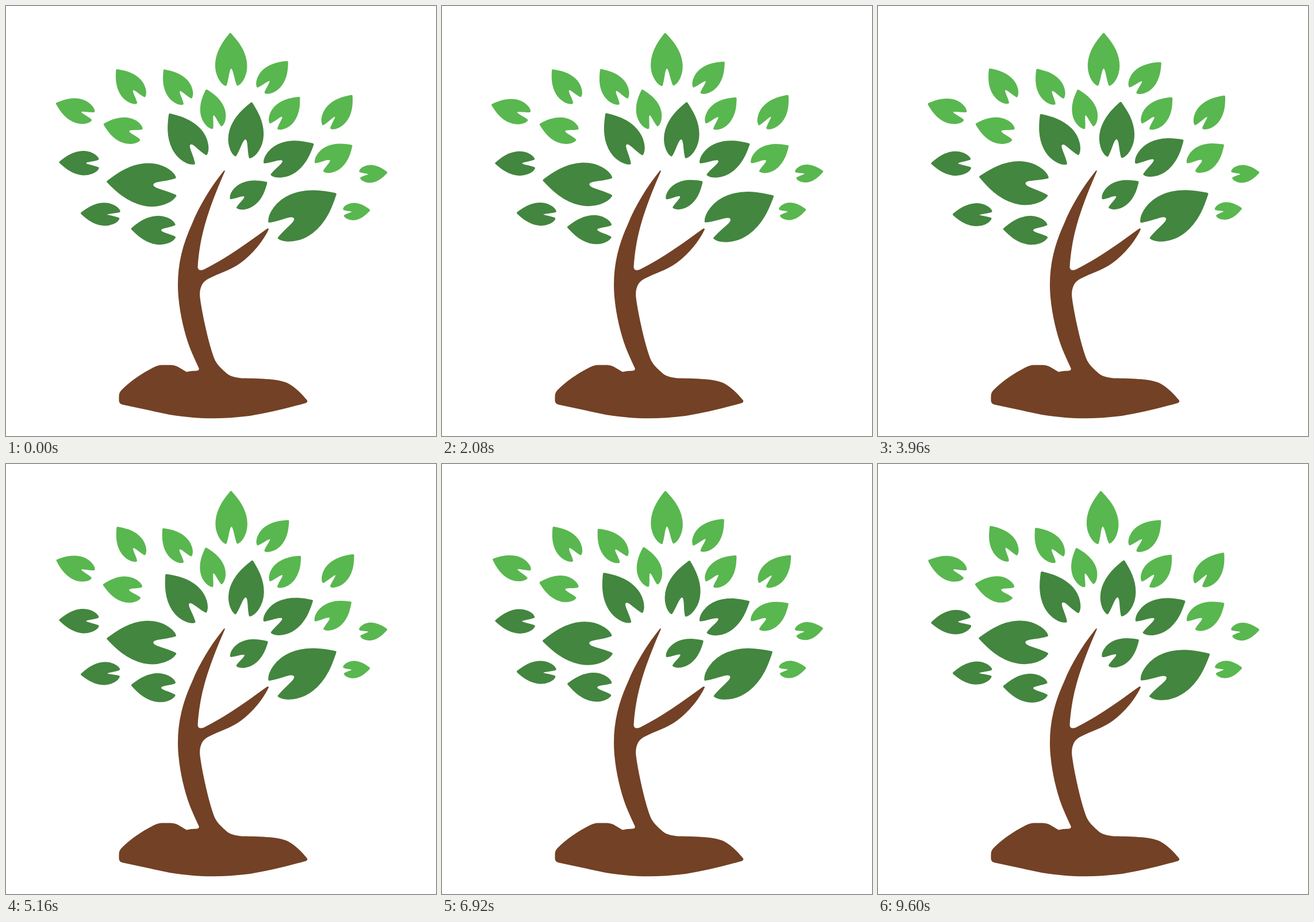
Write an HTML page that moves like this. It is 748 px wide and 748 px high and loops after 9640 ms.

```html
<!DOCTYPE html>
<html lang="en">
<head>
<meta charset="utf-8">
<title>Swaying tree</title>
<style>
html, body { margin: 0; width: 100%; height: 100%; overflow: hidden; background: #fff; }
svg { display: block; width: 100%; height: 100%; }
</style>
</head>
<body>
<svg id="stage" viewBox="0 0 748 748">
  <path fill="#734125" d="M379 286.500 C356 315 336 348 324 378 C307 415 299 448 299 485
    C299 520 308 563 320 595 Q326 610 335.500 630 Q336.500 634 332 634.500
    Q322 634.500 314 636.500 L298 627 Q293 624.500 287 624.500 L271 624.500 Q265 624.500 258 628
    C236 639 216 653 201 668 Q197 672 196.500 678 L196.500 687 Q197 692 203 693.500
    L285 711 C335 719 375 719 424 713 Q468 706 522 690.500 Q526 688 523 685
    C513 673 503 663 490 656 C475 649 447 648 410 647.500 C401 646.500 392 645 385 640
    C377 633 369 626 364 617 C354 595 341 535 337.500 507 C336 493 340 481 351 475
    C372 464 390 460 408 447 C430 431 448 408 457 388.500 Q457 386 454 387.500
    C420 412 385 438 344 458.500 Q334 462 333.500 454 C337 401 350 358 380.500 288 Q381.500 285 379 286.500 Z"/>
</svg>
<script>
const LOOP = 9640, STEP = 40;
const BULGE = 0.22, BULGE_AT = 0.58, NOTCH = 0.34;   // fractions of leaf length

// Each leaf in its resting pose: tip, then its two lobes.
const crowns = {
  '#59b74f': `390,49 382,137 403,136.5 / 490,99 438,139.5 451.5,150.5 / 194.5,111 241,156.5 226,168
    275,113 322,158.5 307,170 / 348,147.5 375,207 358.5,212 / 511,161.5 460,202 474,213
    603,158.5 552,205 566,212.5 / 600.5,243.5 539,271.5 554,287 / 661,287.5 616,287.5 618.5,299.5
    631,354 588,353 590,365 / 89,169.5 152.5,183 147,198.5 / 171.5,207 235.5,213 231.5,233`,
  '#43863f': `283,190.5 348,257 327,274 / 427,169.5 399,259.5 424.5,263 / 531.5,237.5 449.5,272 463,293
    572,326 458,375 475,403.5 / 452.5,308 391.5,334 403,350.5 / 177.5,303 294,298 294,330
    94.5,274.5 159,266 160,282 / 132,363 196.5,357 195.5,370 / 220,384.5 293,380 292.5,402.5`
};

const add = (p, q, k = 1) => [p[0] + q[0] * k, p[1] + q[1] * k];
const sub = (p, q) => add(p, q, -1);
const mix = (p, q, k) => add(p, sub(q, p), k);

let seed = 7;
function random(min, max) {
  seed = (seed * 16807) % 2147483647;
  return min + (max - min) * seed / 2147483647;
}

// Curve from tip over the bulge to a lobe; hand is +1 or -1 for the two sides.
function side(tip, lobe, hand) {
  const v = sub(lobe, tip);
  const normal = [-v[1] * hand, v[0] * hand];
  const at = (along, out) => add(add(tip, v, along), normal, out * BULGE);
  return [at(0.14, 0.43), at(BULGE_AT * 0.58, 1), at(BULGE_AT, 1),
          at(0.81, 1), at(0.97, 0.4), lobe];
}

function outline(tip, l, r, base) {
  const u = sub(l, tip), v = sub(r, tip);
  const hand = Math.sign(u[0] * v[1] - u[1] * v[0]);
  const notch = mix(base, tip, NOTCH), gap = sub(l, r);
  const pts = [
    ...side(tip, l, -hand),
    mix(l, notch, 0.5), add(notch, gap, 0.27), notch,
    add(notch, gap, -0.27), mix(r, notch, 0.5), r,
    ...side(tip, r, hand).reverse().slice(1), tip
  ];
  return `M${tip}C${pts.map(p => p.map(n => n.toFixed(2))).join(' ')}Z`;
}

function makeLeaf(color, [tip, l, r]) {
  const base = mix(l, r, 0.5);
  const el = document.createElementNS('http://www.w3.org/2000/svg', 'path');
  const look = { d: outline(tip, l, r, base), fill: color, stroke: color, 'stroke-width': 4, 'stroke-linejoin': 'round' };
  for (const k in look) el.setAttribute(k, look[k]);
  document.getElementById('stage').append(el);
  const wave = (amp, slow, fast) => ({ amp, hz: random(slow, fast), phase: random(0, 1) });
  return { el, base, waves: [wave(2, 0.3, 0.55), wave(1.1, 0.7, 1.1)] };
}

const leaves = Object.entries(crowns).flatMap(([color, text]) => {
  const points = text.match(/[\d.]+,[\d.]+/g).map(s => s.split(',').map(Number));
  const trios = Array.from({ length: points.length / 3 }, (_, i) => points.slice(i * 3, i * 3 + 3));
  return trios.map(trio => makeLeaf(color, trio));
});

function draw(ms) {
  const t = Math.floor((ms % LOOP) / STEP) * STEP / 1000;
  for (const { el, base, waves } of leaves) {
    const angle = waves.reduce((sum, w) => sum + w.amp * Math.sin(2 * Math.PI * (w.hz * t + w.phase)), 0);
    el.setAttribute('transform', `rotate(${angle.toFixed(3)} ${base})`);
  }
}

let start;
function tick(now) {
  start ??= now;
  draw(now - start);
  requestAnimationFrame(tick);
}
draw(0);
requestAnimationFrame(tick);
</script>
</body>
</html>
```
